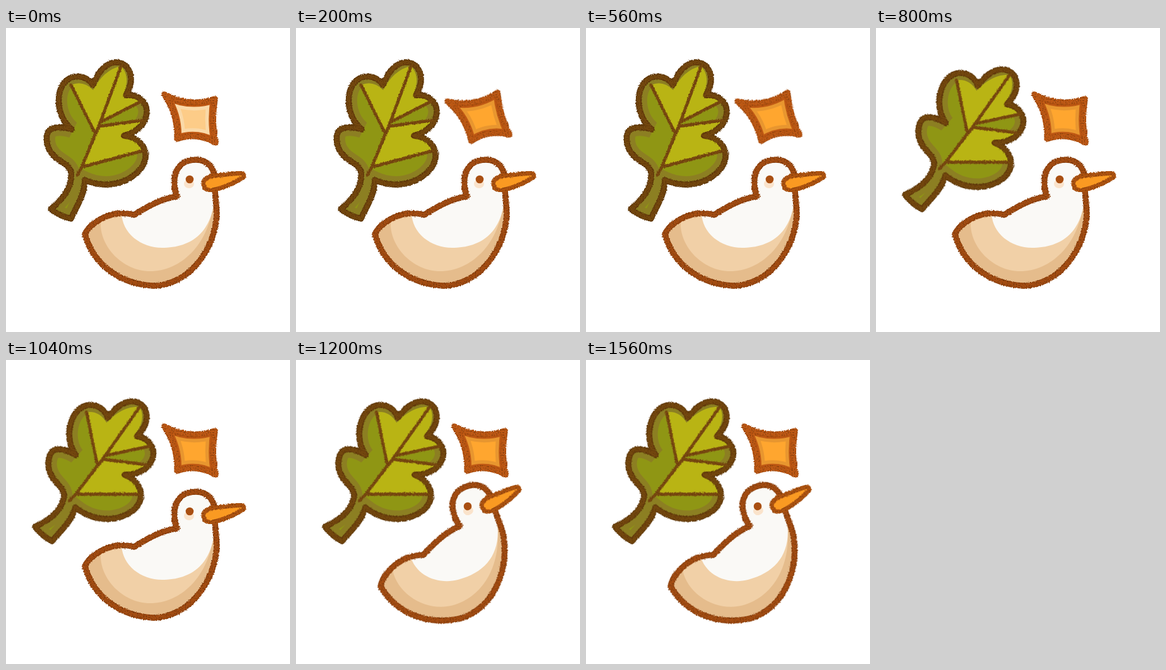
An HTML page that plays this animation: 450 by 480 pixels, repeating every 1.8 s.

```html
<!DOCTYPE html>
<html lang="en">
<head>
<meta charset="utf-8">
<title>Leaf, sparkle and bird</title>
<style>
  html, body { margin: 0; width: 100%; height: 100%; overflow: hidden; background: #fff; }
  svg { display: block; width: 450px; height: 480px; }
  .ink { fill: none; stroke-linejoin: round; stroke-linecap: round; filter: url(#rough); }
  #leaf { --dark: #623b0b; --light: #74480e; }
  #star { --dark: #b6520f; --light: #c05a15; }
  #bird { --dark: #96440d; --light: #a54d12; }
  .edge { stroke: var(--dark); stroke-width: 9.5; }
  .line { stroke: var(--light); stroke-width: 6.5; }
  .inner { fill: none; stroke: var(--light); stroke-width: 14; }
</style>
</head>
<body>
<svg viewBox="0 0 450 480">
  <defs>
    <!-- Crayon edge with darker specks -->
    <filter id="rough" x="-10%" y="-10%" width="120%" height="120%" color-interpolation-filters="sRGB">
      <feTurbulence type="fractalNoise" baseFrequency=".5" numOctaves="2" seed="4" result="noise"/>
      <feDisplacementMap in="SourceGraphic" in2="noise" scale="3.5" xChannelSelector="R" yChannelSelector="G" result="wobbly"/>
      <feColorMatrix in="noise" values="0 0 0 0 .3  0 0 0 0 .14  0 0 0 0 .02  0 0 1.8 0 -.85"/>
      <feComposite in2="wobbly" operator="atop"/>
    </filter>

    <path id="leafShape" d="M71 286C95 266 105 248 103 228C100 214 84 212 74 200C60 184 62 158 76 158Q86 155 104 160C85 145 78 115 88 93C98 73 124 70 138 90C146 68 160 54 175 54C196 55 206 80 190 106C206 104 224 114 223 134C221 152 208 164 187 170C210 172 223 188 221 206C215 235 170 260 125 240C125 262 113 280 103 301Q85 297 71 286Z"/>
    <path id="starShape" d="M251 105Q289 126 331 112Q325 147 332 181Q303 164 271 175Q273 137 251 105Z"/>
    <path id="birdShape" d="M125 326C134 305 165 292 185 292.5Q195 292.5 203 295C222 284 240 271 271 265.5C262 246 264 208 301 208C320 208 331 222 331 240C330 256 333 275 334 292C332 350 290 407 232 407C185 404 140 378 125 326Z"/>
    <path id="beakShape" d="M313 247C312 237 320 235 332 233L370 229Q380 230 376 236C360 246 345 252 328 256C318 257 313 253 313 247Z"/>
    <clipPath id="leafClip"><use href="#leafShape"/></clipPath>
    <clipPath id="starClip"><use href="#starShape"/></clipPath>
    <clipPath id="birdClip"><use href="#birdShape"/></clipPath>
  </defs>

  <g id="leaf">
    <g clip-path="url(#leafClip)">
      <use href="#leafShape" fill="#8f9614"/>
      <use href="#leafShape" fill="none" stroke="#8a6a30" stroke-opacity=".5" stroke-width="27"/>
      <path fill="#b9b414" d="M103 90Q122 82 138 98Q155 66 182 60Q198 76 186 106Q202 102 214 116L149 149L140 164ZM148 155L215 146Q208 162 186 169Q206 172 216 194L121 220Z"/>
    </g>
    <g class="ink">
      <use href="#leafShape" class="edge"/>
      <use href="#leafShape" class="line"/>
      <path stroke="#7a4a10" stroke-width="5" d="M182 61L149 150L119 222L113 232M103 90L140 164M214 116L149 149M215 146L148 155M216 194L122 219"/>
    </g>
  </g>

  <g id="star">
    <g clip-path="url(#starClip)">
      <use id="core" href="#starShape"/>
      <use id="ring" href="#starShape" fill="none" stroke-width="25"/>
      <use href="#starShape" class="inner"/>
    </g>
    <g class="ink">
      <use href="#starShape" class="edge"/>
      <use href="#starShape" class="line"/>
    </g>
  </g>

  <g id="bird">
    <g clip-path="url(#birdClip)">
      <use href="#birdShape" fill="#e5bc8c"/>
      <path fill="#f1d0a7" d="M150 306C148 345 185 384 228 384C275 384 322 345 330 270L300 250L190 280Z"/>
      <path fill="#faf9f6" d="M183 290C183 325 215 347 247 347C295 347 328 322 331 262L340 190H250L180 280Z"/>
      <ellipse cx="290" cy="246" rx="8" ry="7" fill="#fae3cb"/>
    </g>
    <circle cx="291" cy="239" r="6.3" fill="#a94f12"/>
    <g class="ink">
      <use href="#birdShape" class="edge"/>
      <use href="#birdShape" class="line"/>
    </g>
    <use href="#beakShape" fill="#fa9a22"/>
    <g class="ink">
      <use href="#beakShape" stroke="#b05410" stroke-width="7"/>
    </g>
  </g>
</svg>
<script>
  const LOOP = 1800;
  const [leaf, star, bird, core, ring] =
    ['leaf', 'star', 'bird', 'core', 'ring'].map(id => document.getElementById(id));

  // Turn a part about a pivot, then nudge it; at rest it has no transform.
  function pose(part, tilted, angle, [px, py], [dx, dy]) {
    part.setAttribute('transform',
      tilted ? `translate(${dx} ${dy}) rotate(${angle} ${px} ${py})` : '');
  }

  function draw(now) {
    const t = now % LOOP;
    const pale = t < 200;
    pose(leaf, t >= 800, 15, [146, 160], [5, 1]);
    pose(star, t >= 200 && t < 800, -15, [296, 145], [-2, -2]);
    pose(bird, t >= 1200, -15, [291, 239], [-19, -8]);
    core.setAttribute('fill', pale ? '#fdcc88' : '#ffa62f');
    ring.setAttribute('stroke', pale ? '#fad9a8' : '#e8962f');
  }

  const start = performance.now();
  function tick() {
    draw(performance.now() - start);
    requestAnimationFrame(tick);
  }
  tick();
</script>
</body>
</html>
```
